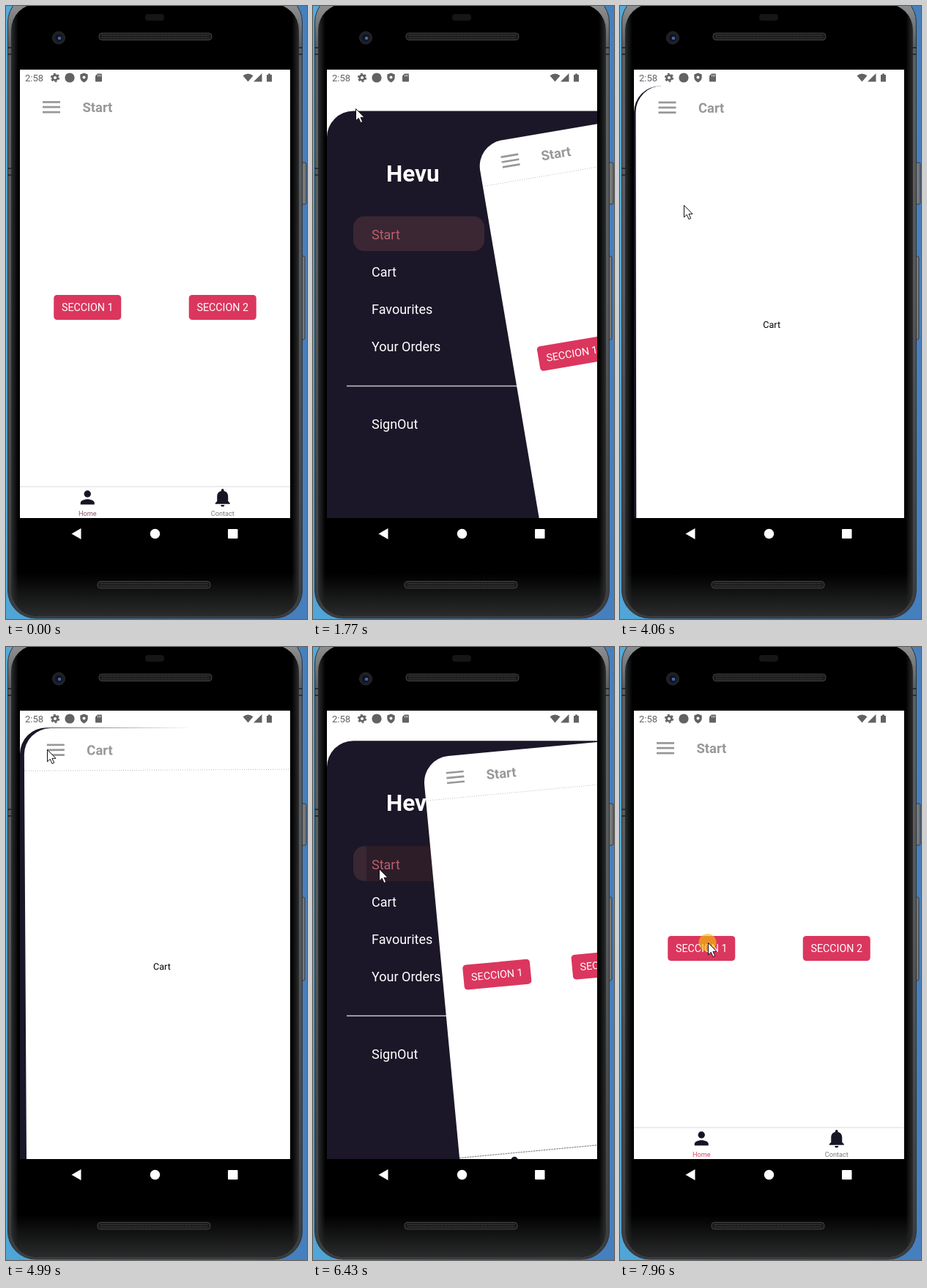
An HTML page that plays this animation: 411x838 px, repeating every 8000 ms.

```html
<!DOCTYPE html>
<html lang="en">
<head>
<meta charset="utf-8">
<title>Drawer menu</title>
<style>
  html, body { margin: 0; width: 100%; height: 100%; overflow: hidden; background: #4499d0; }
  svg { display: block; width: 411px; height: 838px; font-family: Roboto, sans-serif; }
  .menu { font-size: 18px; fill: #fff; }
  .title { font-size: 18.4px; font-weight: 700; fill: #989898; }
  .button { font-size: 14.3px; fill: #fff; text-anchor: middle; }
  .tab { font-size: 9.2px; fill: #777; text-anchor: middle; }
</style>
</head>
<body>
<svg viewBox="0 0 411 838">
  <defs>
    <linearGradient id="sky" x2="1" y2="0.1">
      <stop stop-color="#54aad8"/><stop offset="0.6" stop-color="#3f92d0"/><stop offset="1" stop-color="#467fbd"/>
    </linearGradient>
    <linearGradient id="metal" x2="0" y2="1">
      <stop stop-color="#9a9c9e"/><stop offset="0.08" stop-color="#5d6062"/>
      <stop offset="0.5" stop-color="#55585a"/><stop offset="1" stop-color="#3a3c3e"/>
    </linearGradient>
    <linearGradient id="sides">
      <stop stop-color="#2c2d2e"/><stop offset="0.025" stop-color="#000"/>
      <stop offset="0.975" stop-color="#000"/><stop offset="1" stop-color="#2c2d2e"/>
    </linearGradient>
    <linearGradient id="chin" x2="0" y2="1">
      <stop offset="0.93" stop-color="#2a2b2c" stop-opacity="0"/><stop offset="1" stop-color="#2a2b2c"/>
    </linearGradient>
    <clipPath id="screen"><rect x="19" y="87" width="369" height="613"/></clipPath>
    <rect id="button" x="-46" y="395" width="92" height="34" rx="4.5" fill="#db365e"/>
    <g id="speaker">
      <rect width="154" height="9.5" rx="4" fill="#1b1b1b" stroke="#444"/>
      <path d="M4 3H150M4 6.5H150" stroke="#3c3c3c" stroke-width="1.5" stroke-dasharray="1.5 1"/>
    </g>
  </defs>

  <!-- Phone -->
  <rect width="411" height="838" fill="url(#sky)"/>
  <g fill="#77797b" stroke="#3a3a3a">
    <rect x="402" y="214" width="8" height="57" rx="2"/>
    <rect x="402" y="342" width="6" height="114" rx="2"/>
  </g>
  <rect x="2.5" y="-16" width="402" height="853" rx="38" fill="url(#metal)" stroke="#303234"/>
  <rect x="7" y="-3" width="393" height="837" rx="36" fill="url(#sides)"/>
  <rect x="7" y="-3" width="393" height="837" rx="36" fill="url(#chin)"/>
  <path d="M2 57h6M2 66h6M2 222h6M2 231h6M399 57h6M399 66h6" stroke="#202224" stroke-width="1.5"/>
  <rect x="190" y="11" width="26" height="9" rx="4" fill="#161616"/>
  <use href="#speaker" x="127" y="37"/>
  <use href="#speaker" x="125" y="786.5"/>
  <circle cx="72" cy="43.5" r="8.5" fill="#1d1f24" stroke="#2b2b2e"/>
  <circle cx="72" cy="43.5" r="4.5" fill="#0c1222"/>
  <circle cx="73" cy="44" r="2.3" fill="#4468a4"/>
  <g fill="#fff">
    <path d="M89.5 721.5L102.5 714V729Z"/>
    <circle cx="203.5" cy="721.5" r="6.7"/>
    <rect x="303" y="715" width="13.5" height="13" rx="1"/>
    <rect x="19" y="87" width="369" height="613"/>
  </g>

  <!-- Status bar -->
  <g fill="#626262">
    <text x="26" y="103" font-size="13">2:58</text>
    <circle cx="67" cy="98" r="3.4" fill="none" stroke="#626262" stroke-width="2.6"/>
    <circle cx="67" cy="98" r="5.3" fill="none" stroke="#626262" stroke-width="1.8" stroke-dasharray="2.8 2.75"/>
    <circle cx="87" cy="98" r="6.6"/>
    <path d="M106.5 91.5l5.2 2v4c0 3.2-2.2 5.7-5.2 7c-3-1.3-5.2-3.8-5.2-7v-4z"/>
    <circle cx="106.5" cy="97.5" r="2" fill="#fff"/>
    <path d="M125 92.5h5q1 0 1 1v9q0 1-1 1h-7q-1 0-1-1v-7z"/>
    <path d="M125.5 94v2.5M127.5 94v2.5M129.3 94v2.5" stroke="#fff" stroke-width=".7"/>
    <path d="M323.5 95.2q7-5.6 14 0l-7 8.3zM349.5 92v11.5h-11.5zM356 94h2v-1.5h3v1.5h2v9.5h-7z"/>
  </g>

  <g clip-path="url(#screen)">
    <!-- Drawer -->
    <g id="drawer">
      <path d="M19 900V145a36 36 0 0 1 36-36H388V900Z" fill="#1b1728"/>
      <text x="100" y="205" font-size="31.5" font-weight="700" fill="#fff">Hevu</text>
      <rect id="pill" x="55" y="253" width="179" height="47.5" rx="15" fill="#3a2733"/>
      <rect id="hover" x="73" width="191" height="47" fill="#08040c"/>
      <g class="menu">
        <text id="startItem" x="80">Start</text>
        <text id="cartItem" x="80" y="335.5">Cart</text>
        <text x="80" y="386.5">Favourites</text>
        <text x="80" y="437.5">Your Orders</text>
        <text x="80" y="543.5">SignOut</text>
      </g>
      <path d="M46 485H340" stroke="#c4c3c7" stroke-width="1.5"/>
    </g>

    <!-- Page -->
    <g id="page">
      <path d="M19 700V144.500a36 36 0 0 1 36-36H430V700Z" fill="#fff"/>
      <path d="M50 131.300h24M50 138.200h24M50 145.100h24" stroke="#989898" stroke-width="2.700"/>
      <text id="title" class="title" x="104.500" y="145.300"></text>
      <path id="headerLine" d="M19 166.500H430" stroke="#bbb" stroke-dasharray="1 2"/>
      <g id="home">
        <path d="M19 657H430" stroke="#e6e6e8" stroke-width="1.5"/>
        <path id="tabLine" d="M19 657H430" stroke="#777" stroke-dasharray="2 1.5"/>
        <g id="left">
          <use href="#button"/>
          <text class="button" y="417.3">SECCION 1</text>
          <circle cy="667" r="4.7" fill="#151525"/>
          <path d="M-9.5 681.5v-2.5c0-3.2 6.3-4.8 9.5-4.8s9.5 1.6 9.5 4.8v2.5z" fill="#151525"/>
          <text id="homeTab" class="tab" y="697.3">Home</text>
        </g>
        <g id="right">
          <use href="#button"/>
          <text class="button" y="417.3">SECCION 2</text>
          <path d="M-1.8 663v-1.2a1.8 1.8 0 0 1 3.6 0v1.2c4 .9 5.7 4 5.7 7.5v6.5l2.5 2.5v1.3h-20v-1.3l2.5-2.5v-6.5c0-3.5 1.7-6.6 5.7-7.5zM-2.5 682h5a2.5 2.5 0 0 1-5 0z" fill="#151525"/>
          <text class="tab" y="697.3">Contact</text>
        </g>
      </g>
      <text id="cartBody" x="193.5" y="439.5" font-size="12.6">Cart</text>
    </g>
  </g>

  <g id="pointer">
    <circle id="click" r="12" cx="-.5" fill="#f4c20d" opacity=".65"/>
    <path d="M.5.5V16.8L4.3 13.3l2.7 6.2 2.7-1.2-2.7-6h5z" fill="#fff" stroke="#111"/>
  </g>
</svg>

<script>
const LOOP = 8000;
const el = {};
document.querySelectorAll('[id]').forEach(node => el[node.id] = node);

const swings = [
  { at: 1390, open: true }, { at: 3652, open: false },
  { at: 4970, open: true }, { at: 6339, open: false }
];
const clicks = [[1160, 1230], [4720, 4790], [7960, 8000]];
const hovers = [
  { from: 2600, to: 4400, y: 304.5 },
  { from: 5780, to: 7100, y: 253 }
];
// time, x, y
const pointerPath = [
  [170, 365, 727], [940, 61, 146], [1010, 58, 140], [2000, 58, 140],
  [2430, 91, 356], [3720, 91, 356], [4060, 87, 272], [4400, 57, 148],
  [4500, 56, 140], [4990, 56, 140], [5260, 61, 223], [5730, 82, 288],
  [6050, 90, 303], [6520, 90, 303], [7360, 120, 404], [8000, 120, 404]
];

const clamp = v => Math.max(0, Math.min(1, v));
const smooth = v => v * v * (3 - 2 * v);
const show = (node, on) => node.setAttribute('display', on ? 'inline' : 'none');
const move = (node, x, y = 0) => node.setAttribute('transform', `translate(${x} ${y})`);

// Critically damped spring; returns how far the drawer is open.
function openness(t, openLag = 0, closeLag = 0) {
  let value = 0;
  for (const { at, open } of swings) {
    const elapsed = (t - at - (open ? openLag : closeLag)) / 1000;
    if (elapsed < 0) break;
    const k = elapsed * (open ? 13.3 : 17);
    const rest = (1 + k) * Math.exp(-k);
    value = open ? 1 - rest : rest;
  }
  return value;
}

function pointerAt(t) {
  const i = Math.max(1, pointerPath.findIndex(point => point[0] > t));
  const [t0, x0, y0] = pointerPath[i - 1];
  const [t1, x1, y1] = pointerPath[i];
  const f = smooth(clamp((t - t0) / (t1 - t0)));
  return [x0 + (x1 - x0) * f, y0 + (y1 - y0) * f];
}

function draw(t) {
  const p = openness(t);
  // The page is laid out again slightly after the drawer starts to move.
  const inset = 35.5 * openness(t, 50, 100);
  const squeeze = 17.75 * openness(t, 230, 100);
  const onCart = t >= 3700 && t < 6400;

  show(el.drawer, p > 0.002);
  move(el.drawer, 0, 36 * p);
  el.pill.setAttribute('y', onCart ? 304 : 253);
  el.startItem.setAttribute('y', onCart ? 280 : 284.5);
  el.startItem.setAttribute('fill', onCart ? '#fff' : '#b95f6d');
  el.cartItem.setAttribute('fill', onCart ? '#b95f6d' : '#fff');

  const hover = hovers.find(h => t >= h.from && t < h.to);
  show(el.hover, hover);
  if (hover) {
    el.hover.setAttribute('y', hover.y);
    el.hover.setAttribute('opacity', 0.27 * clamp((t - hover.from) / 400));
  }

  el.page.setAttribute('transform',
    `translate(${226 * p} ${53.5 * p}) rotate(${-10 * p} 203.5 404.5) translate(${inset} 0)`);
  el.title.textContent = onCart ? 'Cart' : 'Start';
  show(el.headerLine, p > 0.03);
  show(el.tabLine, p > 0.03);
  show(el.home, !onCart);
  show(el.cartBody, onCart);
  move(el.left, 111.25 - squeeze);
  move(el.right, 295.75 - 3 * squeeze);
  move(el.cartBody, -2 * squeeze);
  el.homeTab.style.fill = t < 3700 ? '#8a5467' : '#cf4767';

  show(el.pointer, t >= 170);
  move(el.pointer, ...pointerAt(t));
  show(el.click, clicks.some(([from, to]) => t >= from && t < to));
}

const start = performance.now();
function tick() {
  draw((performance.now() - start) % LOOP);
  requestAnimationFrame(tick);
}
tick();
</script>
</body>
</html>
```
